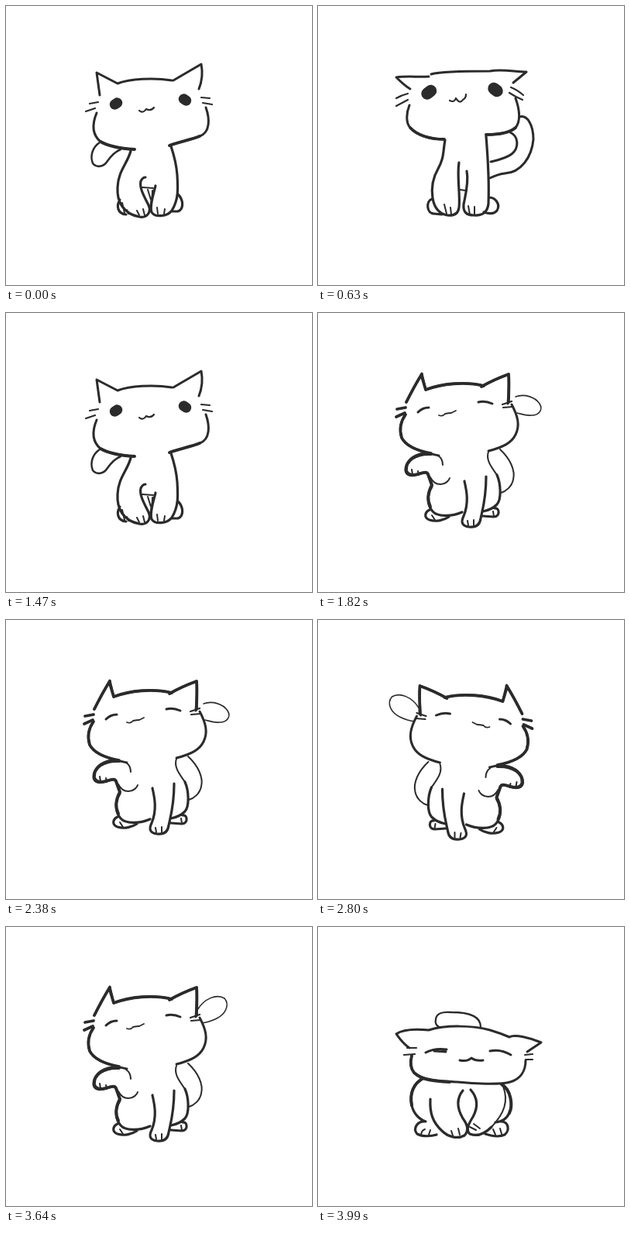
An HTML page with a canvas for the animation above (4.06 s loop, 395 px wide and 360 px high).

```html
<!DOCTYPE html>
<html lang="en">
<head>
<meta charset="utf-8">
<title>Dancing cat</title>
<style>
  html, body { margin: 0; width: 100%; height: 100%; overflow: hidden; background: #fff; }
  canvas { display: block; }
</style>
</head>
<body>
<canvas id="stage" width="395" height="360"></canvas>
<script>
const ctx = document.getElementById('stage').getContext('2d');
const INK = '#2b2b2b', STEP = 70, FRAMES = 58, SECOND_DANCE = 25, GROUND = 270;

// Head outlines run clockwise in open pieces, so the joined pieces also make a mask.
const heads = {
  perky: {
    outline: `M166,185 C150,184 132,181 122,175 C110,165 112,150 117,138
      M121,115 L117,86 L144,100 C160,94 190,92 214,96
      M216,96 L252,75 C254,85 253,97 249,107
      M258,131 C263,145 264,163 250,168 C240,172 222,176 211,180`,
    bold: 'M166,185 C150,184 132,181 122,175 M250,168 C240,172 222,176 211,180',
    marks: `M119,124 L108,126 M115,132 L103,136 M252,118 L263,119 M254,125 L266,127
      M172,135 Q177,139 181,133 Q187,136 191,131`,
    eyes: 'M140.500,127 L143.500,125 M229.500,120 L232.500,122', eyeSize: 13.500
  },
  droopy: {
    outline: `M163,172 C145,172 128,167 119,157 C113,150 114,138 118,128
      M119,107 C112,103 106,97 101,92 C115,90 130,92 143,91
      M146,88 C160,84 195,84 222,84 C237,81 255,85 269,85 L252,99
      M255,119 C260,133 262,148 255,157 C248,163 235,166 217,166`,
    bold: 'M163,172 C145,172 128,167 119,157 M255,157 C248,163 235,166 217,166',
    marks: `M116,113 Q108,115 101,119 M116,121 L101,129 M249,105 Q257,108 265,115
      M247,112 Q256,118 264,121 M170,122 Q176,125 178,119 Q183,127 187,121 Q191,119 191,114`,
    eyes: 'M141,113 L145.500,109.500 M227,106.500 L231,109.500', eyeSize: 15.500
  },
  happy: {
    outline: `M156,184 C142,181 116,176 108,161 C104,148 108,138 113,131
      M114,115 C120,103 127,90 134,78 L139,99 C160,91 190,88 214,94
      M211,95 C225,87 235,83 246,79 C247,92 246,104 245,117
      M250,118 C258,133 261,145 255,157 C250,167 240,173 220,178`,
    bold: `M146,181 C130,178 114,173 108,161 C104,148 108,138 113,131
      M114,115 C120,103 127,90 134,79 M134,82 L139,99 C160,91 190,88 214,94
      M211,95 C225,87 235,83 246,79 C247,92 246,104 246,115
      M113,122 L102,124 M112,129 L101,134`,
    marks: 'M238,118 L250,114 M239,122 L251,121',
    lids: 'M129,128 Q135,122 143,122 M207,115 Q216,113 225,117',
    fine: 'M156,132 Q161,134 164,130 Q169,129 172,129 L178,126'
  },
  squashed: {
    outline: `M118,156 C110,151 106,145 101,138 C108,133 122,131 143,133
      C165,126 200,127 222,133 C232,136 240,139 247,142
      C254,138 274,143 288,149 L270,161
      M268,172 C268,185 262,196 248,200 C235,204 200,202 180,200
      C160,199 135,198 124,188 C119,182 119,174 121,166`,
    bold: 'M170,200 C150,199 135,198 124,188 C119,182 119,174 121,166',
    marks: 'M127,156 L115,156 M125,164 L111,165 M267,165 L277,164 M268,171 L277,171',
    lids: `M139,162 Q150,156 166,158 M150,160 L165,161 M222,160 Q236,157 249,165
      M183,172 Q193,174 198,169 Q203,173 213,172`
  }
};

const bodies = {
  sitting: {
    lines: `M161,187 C157,203 145,212 144,234 C143,252 151,268 172,272
      C182,274 188,266 184,257 C178,245 172,235 174,226 C176,222 178,221 180,221
      M213,181 C216,190 220,205 221,218 C222,235 223,250 214,264
      C208,272 192,273 188,266 C185,258 190,245 193,232
      M147,250 C142,258 144,268 155,269 M222,243 C229,250 230,262 222,265 L214,265`,
    fine: `M176,234 L190,235 M189,238 C189,248 187,255 186,262 M183,237 L187,250
      M169,264 l3,6 M177,262 l2,8 M195,260 l1,8 M205,262 l-1,6 M150,254 l3,13 M156,263 l2,5`
  },
  standing: {
    lines: `M164,173 C161,190 163,195 155,210 C148,222 146,235 148,248
      C150,260 156,268 167,270 C176,271 181,268 182,260 C184,245 179,220 182,202
      M192,213 C195,228 190,245 188,256 C187,266 192,270 201,270
      C212,271 219,266 220,255 C221,230 220,205 217,168
      M147,249 C139,252 140,268 150,268 L160,269
      M221,247 C229,247 236,256 231,264 C227,269 220,268 214,266`,
    fine: 'M183,237 L190,238 M163,256 l3,12 M171,260 l1,9 M194,258 l2,11 M202,259 l0,10'
  },
  waving: {
    lines: `M137,181 C122,183 113,192 113,203 C114,210 121,211 129,208
      C136,206 140,204 142,208 L147,222 M147,224 C140,235 141,248 148,256 C154,263 172,263 186,257
      M144,254 C138,257 136,264 144,267 C153,270 163,267 169,263
      M189,217 C192,230 195,245 188,262 C184,270 186,275 195,276
      C204,277 209,273 210,265 C212,255 217,240 217,211
      M231,209 C236,220 237,240 231,247 C226,252 219,255 213,256
      M228,252 C235,251 235,263 227,263 L213,262`,
    bold: `M146,182 C124,181 113,192 114,203 C115,209 121,210 129,208
      C136,206 140,204 142,208 L147,222 C140,235 142,244 145,250`,
    fine: `M155,184 Q161,188 161,196 M145,212 C148,218 152,221 158,221 C165,221 169,216 170,213
      M220,179 C216,190 225,200 231,209 M235,176 C248,188 255,203 252,215 C250,224 243,230 236,232
      M121,202 l1,6 M129,204 l1,5 M193,268 l1,6 M201,267 l0,7 M147,261 l4,6 M226,256 l1,6`
  },
  crouching: {
    lines: `M136,195 C123,202 118,215 121,230 C123,240 130,248 139,251
      C128,250 122,260 128,267 C135,271 147,270 153,268
      M145,222 C144,240 148,252 160,263 C168,271 180,274 189,269
      C195,263 193,255 187,247 C180,235 178,222 187,211
      M197,210 C206,220 207,232 200,245 C195,253 190,262 196,267 C206,271 216,266 224,258
      M237,203 C249,210 252,230 247,240 C243,248 238,251 229,252
      M236,251 C246,251 248,262 241,268 C235,271 225,270 216,267`,
    bold: 'M136,195 C123,202 118,215 121,230 M237,203 C249,210 252,230 247,240',
    fine: `M239,206 C246,224 241,240 224,258 M133,268 Q134,262 138,261 M143,268 l2,-6
      M172,263 l2,6 M181,260 l2,8 M196,258 l8,4 M201,254 l8,6 M226,261 l3,7 M235,260 l2,7`
  }
};

const pose = (head, dy, body, stretch, tail, tailWidth = 3) =>
  ({ head: heads[head], dy, body: bodies[body], stretch, tail, tailWidth });

const bounce = [
  pose('perky', 0, 'sitting', 1, 'M121,176 C112,182 108,193 112,203 C117,209 126,208 131,200 C136,193 141,188 148,185', 2.5),
  pose('droopy', 17, 'sitting', .97, 'M221,203 C238,200 250,196 258,200 C268,208 259,222 245,225 C236,228 228,229 222,230'),
  pose('droopy', 0, 'standing', 1, 'M260,143 C271,140 278,155 278,172 C276,195 262,215 241,216 C233,217 228,219 222,222 M248,163 C259,168 260,183 250,191 C242,197 231,199 223,201'),
  pose('droopy', -6, 'standing', 1.05, 'M257,132 C266,112 279,112 284,124 C288,150 270,190 248,202 C238,207 228,211 221,213 M253,154 C256,170 246,184 222,193'),
  pose('perky', -14, 'standing', 1.02, 'M114,124 C104,108 91,104 84,113 C79,126 92,138 114,146', 2.5),
  pose('perky', -12, 'standing', 1, 'M114,139 C98,129 79,129 72,140 C69,153 82,161 98,158 L114,156', 2.5),
  pose('perky', -6, 'sitting', 1.06, 'M115,158 C98,160 86,170 87,182 C92,192 106,188 114,180 L126,172', 2.5)
];

const wave = [
  pose('squashed', 0, 'crouching', 1, 'M168,129 C158,132 150,128 152,119 C153,111 160,109 172,110 C190,110 210,113 210,129', 2.3),
  pose('happy', 0, 'waving', 1, 'M255,108 C266,104 280,108 286,117 C291,125 285,132 276,132 C268,133 262,130 257,129', 1.6),
  pose('happy', 1, 'waving', 1, 'M257,139 C274,128 298,130 304,145 C307,157 296,163 284,159 C272,156 265,156 256,158', 1.6),
  pose('happy', -1, 'waving', 1, 'M247,107 C256,92 272,86 282,92 C289,100 284,112 272,118 C266,121 262,123 252,124', 1.6)
];

function stroke(path, width) {
  if (!path) return;
  ctx.lineWidth = width;
  ctx.stroke(new Path2D(path));
}

function drawHead({ outline, bold, marks, lids, fine, eyes, eyeSize }) {
  ctx.fill(new Path2D('M' + outline.slice(1).replace(/M/g, 'L')));
  stroke(outline, 3);
  stroke(bold, 3.8);
  stroke(marks, 2.2);
  stroke(lids, 3);
  stroke(fine, 1.8);
  stroke(eyes, eyeSize);
}

function drawCat({ head, dy, body, stretch, tail, tailWidth }) {
  stroke(tail, tailWidth);
  ctx.save();
  ctx.translate(0, GROUND * (1 - stretch));
  ctx.scale(1, stretch);
  stroke(body.lines, 3.2);
  stroke(body.bold, 4);
  stroke(body.fine, 2);
  ctx.restore();
  ctx.save();
  ctx.translate(0, dy);
  drawHead(head);
  ctx.restore();
}

function draw(now) {
  const frame = Math.floor(now / STEP) % FRAMES;
  ctx.setTransform(1, 0, 0, 1, 0, 0);
  ctx.fillStyle = '#fff';
  ctx.strokeStyle = INK;
  ctx.lineCap = ctx.lineJoin = 'round';
  ctx.fillRect(0, 0, 395, 360);
  if (frame < SECOND_DANCE) {
    drawCat(bounce[frame % bounce.length]);
  } else {
    const beat = (frame - SECOND_DANCE) % 8;
    // The second half of each wave is the mirror image, a little lower.
    if (beat >= 4) ctx.setTransform(-1, 0, 0, 1, 377.5, 7);
    drawCat(wave[beat % 4]);
  }
}

const start = performance.now();
function tick() {
  draw(performance.now() - start);
  requestAnimationFrame(tick);
}
tick();
</script>
</body>
</html>
```
